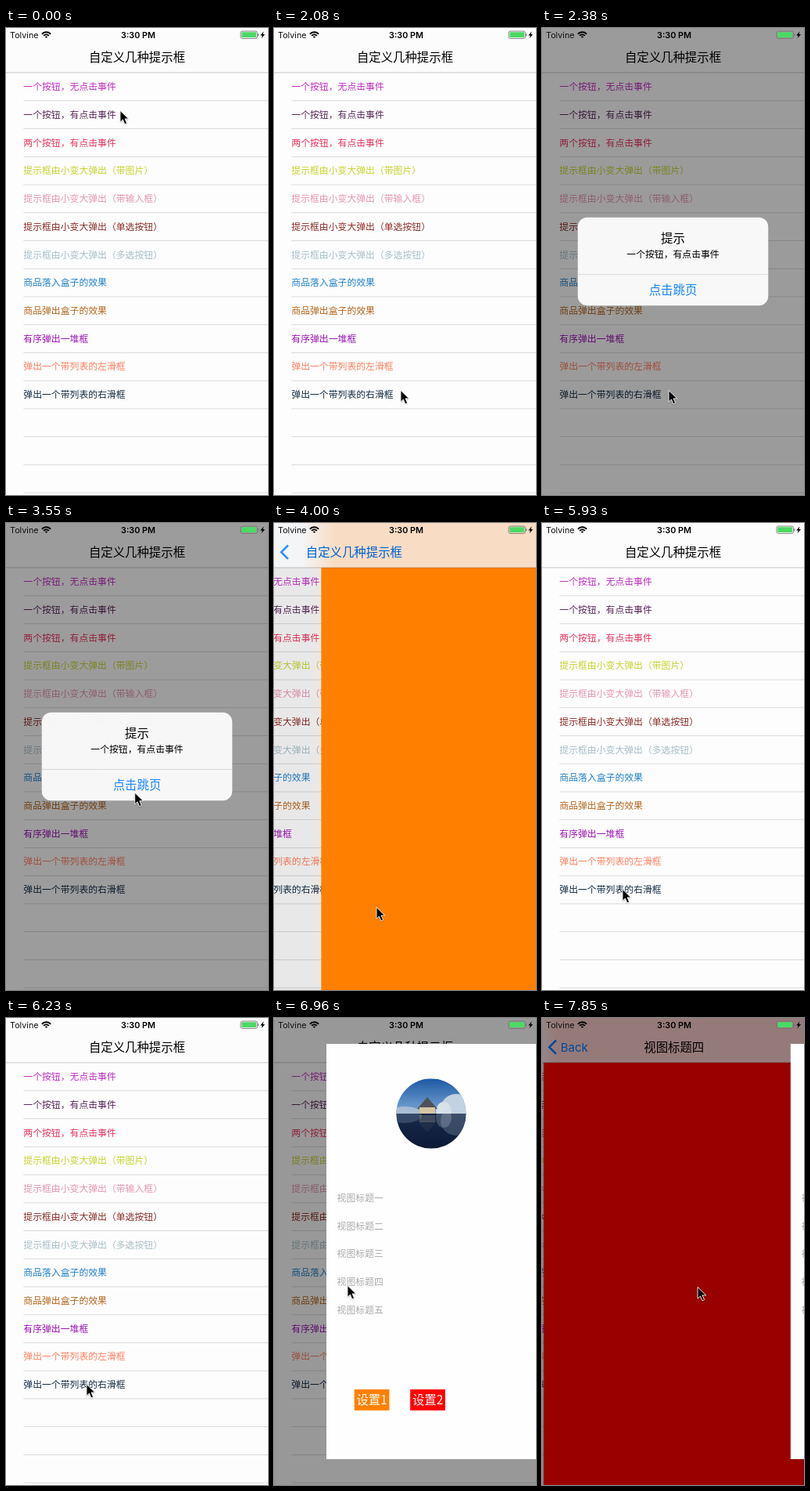
An HTML page with a canvas that plays this animation: 335 by 596 pixels, repeating every 8 s.

```html
<!DOCTYPE html>
<html lang="zh-CN">
<head>
<meta charset="utf-8">
<style>
html, body { margin: 0; width: 100%; height: 100%; overflow: hidden; background: #fdfdfd; }
canvas { display: block; width: 335px; height: 596px; }
</style>
</head>
<body>
<canvas id="stage"></canvas>
<script>
const W = 335, H = 596, LOOP = 8000, STEP = 147.8;
const PT = W / 375;                       // one point of the phone's layout
const BAR = 64 * PT, ROW = 40 * PT, INSET = 25 * PT;
const SMALL = 11.85, BIG = 15.4;
const BLUE = '#007aff';
const CJK = '"Noto Sans CJK SC", "Noto Sans CJK", sans-serif';
const LATIN = 'Inter, Roboto, sans-serif';
const TITLE = '自定义几种提示框';

const rows = [
  ['一个按钮，无点击事件', '#c031c0'],
  ['一个按钮，有点击事件', '#5a2a5a'],
  ['两个按钮，有点击事件', '#e8355f'],
  ['提示框由小变大弹出（带图片）', '#c6d32f'],
  ['提示框由小变大弹出（带输入框）', '#e596b2'],
  ['提示框由小变大弹出（单选按钮）', '#8c2e28'],
  ['提示框由小变大弹出（多选按钮）', '#a9bfc8'],
  ['商品落入盒子的效果', '#2080c8'],
  ['商品弹出盒子的效果', '#b4661c'],
  ['有序弹出一堆框', '#9a14b4'],
  ['弹出一个带列表的左滑框', '#ff8060'],
  ['弹出一个带列表的右滑框', '#142c44']
];

const orangePage = { color: '#ff8000', bar: '#f9dcc4', title: '' };
const redPage = { color: '#ff0000', bar: '#f8caca', title: '视图标题四' };

const arrow = new Path2D('M0 .4V15.2L3.4 12 5.9 17.8 8.6 16.6 6.1 10.9H10.7Z');
const bolt = new Path2D('M329.6 4.2L325.2 9.4H327.7L326.6 13.2 331 7.9H328.5Z');

const canvas = document.getElementById('stage');
const ctx = canvas.getContext('2d');
const dpr = window.devicePixelRatio || 1;
canvas.width = W * dpr;
canvas.height = H * dpr;

const clamp = v => Math.max(0, Math.min(1, v));
const ramp = (t, a, b) => clamp((t - a) / (b - a));
const mix = (a, b, p) => a + (b - a) * p;
const smooth = p => p * p * (3 - 2 * p);
const easeInOut = p => p < 0.5 ? 2 * p * p : 1 - 2 * (1 - p) ** 2;
const easeOut = p => 1 - (1 - p) ** 3;

// Critically damped settle used by navigation pushes
function settle(ms) {
  const x = Math.max(0, ms) * 0.014;
  return 1 - (1 + x) * Math.exp(-x);
}

function rect(x, y, w, h, color) {
  ctx.fillStyle = color;
  ctx.fillRect(x, y, w, h);
}

function round(x, y, w, h, r, color) {
  ctx.beginPath();
  ctx.roundRect(x, y, w, h, r);
  ctx.fillStyle = color;
  ctx.fill();
}

function oval(x, y, rx, ry, color) {
  ctx.beginPath();
  ctx.ellipse(x, y, rx, ry, 0, 0, 7);
  ctx.fillStyle = color;
  ctx.fill();
}

function fade(x0, y0, x1, y1, from, to) {
  const g = ctx.createLinearGradient(x0, y0, x1, y1);
  g.addColorStop(0, from);
  g.addColorStop(1, to);
  return g;
}

function shade(alpha) {
  if (alpha > 0) rect(0, 0, W, H, `rgba(0,0,0,${alpha})`);
}

function label(s, x, cy, size, color, { weight = 400, align = 'left', family = CJK, alpha = 1 } = {}) {
  ctx.save();
  ctx.globalAlpha *= alpha;
  ctx.font = `${weight} ${size}px ${family}`;
  ctx.textAlign = align;
  ctx.fillStyle = color;
  ctx.fillText(s, x, cy + size * 0.37);
  ctx.restore();
}

function list(dx) {
  ctx.save();
  ctx.translate(dx, 0);
  rect(0, 0, W, H, '#fdfdfd');
  for (let y = BAR + ROW; y < H; y += ROW) rect(INSET, y - 0.5, W, 0.9, '#d6d6d8');
  rows.forEach(([s, color], i) => label(s, INSET, BAR + ROW * (i + 0.5) - 0.3, SMALL, color));
  ctx.restore();
}

function navBar(x, p, page) {
  rect(0, 0, W, 57, p > 0 ? fade(x - 24, 0, x + 18, 0, '#f4f5f6', page.bar) : '#fcfcfc');
  rect(0, 56.5, W, 0.9, 'rgba(0,0,0,.24)');

  const cy = 37.2, left = mix(105.9, 26.5, p);
  const bold = { weight: 500 };
  if (p > 0) {
    ctx.save();
    ctx.globalAlpha = p;
    ctx.strokeStyle = BLUE;
    ctx.lineWidth = 2.6;
    ctx.beginPath();
    ctx.moveTo(18, cy - 8.7);
    ctx.lineTo(9.3, cy);
    ctx.lineTo(18, cy + 8.7);
    ctx.stroke();
    ctx.restore();
    if (page.title) {
      label('Back', mix(150, 23, p), cy, 15, BLUE, { family: LATIN, alpha: p });
      label(page.title, mix(W + 40, W / 2, p), cy, BIG, '#000', { ...bold, align: 'center', alpha: p });
    } else {
      label(TITLE, left, cy, BIG, BLUE);
    }
  }
  label(TITLE, left, cy, BIG, '#000', { ...(p > 0 ? {} : bold), alpha: 1 - p });
}

function statusBar() {
  label('Tolvine', 5, 9, 10.8, '#111', { family: LATIN });
  label('3:30 PM', 169, 9, 10.8, '#000', { family: LATIN, weight: 600, align: 'center' });

  ctx.strokeStyle = '#000';
  ctx.lineWidth = 1.9;
  for (let r = 1.5; r < 9; r += 3.1) {
    ctx.beginPath();
    ctx.arc(51.5, 13, r, -Math.PI * 0.76, -Math.PI * 0.24);
    ctx.stroke();
  }

  ctx.strokeStyle = '#777';
  ctx.lineWidth = 0.9;
  ctx.beginPath();
  ctx.roundRect(300, 4, 21.4, 9.4, 2.3);
  ctx.stroke();
  round(301.3, 5.3, 18.8, 6.8, 1, '#4cd964');
  rect(322.2, 7.2, 1.1, 3, '#777');
  ctx.fillStyle = '#000';
  ctx.fill(bolt);
}

function alertBox(alpha, scale) {
  if (alpha <= 0) return;
  shade(0.39 * alpha);
  ctx.save();
  ctx.globalAlpha = alpha;
  ctx.translate(W / 2, H / 2);
  ctx.scale(scale, scale);
  const w = 243.5, h = 112.3, mid = { align: 'center' };
  round(-w / 2, -h / 2, w, h, 12, '#f8f8f8');
  rect(-w / 2, 16, w, 0.8, '#d2d2d4');
  label('提示', 0, -29.3, BIG, '#000', { ...mid, weight: 500 });
  label(rows[1][0], 0, -9.7, SMALL, '#000', mid);
  label('点击跳页', 0, 36.4, BIG, '#1485ff', mid);
  ctx.restore();
}

function shore() {
  oval(-34, 0, 22, 9, '#a9bdd2');
  oval(32, -6, 20, 19, '#c3d2e0');
  oval(16, -2, 10, 13, '#d8e2ea');
  ctx.beginPath();
  ctx.moveTo(-18, -6);
  ctx.lineTo(-5, -21);
  ctx.lineTo(8, -6);
  ctx.fillStyle = '#4f5258';
  ctx.fill();
  rect(-15, -8, 20, 9, '#d6c6a2');
}

// Round lakeside picture in flat tones, mirrored in the water
function picture(cx, cy, r) {
  ctx.save();
  ctx.beginPath();
  ctx.arc(cx, cy, r, 0, 7);
  ctx.clip();
  ctx.translate(cx, cy);
  rect(-r, -r, 2 * r, r, fade(0, -r, 0, 0, '#1c59a4', '#7ba8d6'));
  shore();
  rect(-r, 0, 2 * r, r, fade(0, 0, 0, r, '#16294a', '#0c1a36'));
  ctx.globalAlpha = 0.22;
  ctx.translate(0, 3);
  ctx.scale(1, -1);
  shore();
  ctx.restore();
}

function drawer(x) {
  ctx.save();
  ctx.translate(x, 0);
  rect(0, 33, 268, 530, '#fefefe');
  picture(134, 122, 44.7);
  [...'一二三四五'].forEach((n, i) => label('视图标题' + n, 13.6, 229.6 + ROW * i, SMALL, '#aaa'));
  ['#ff8000', '#ff0000'].forEach((color, i) => {
    const bx = 35.7 + 2 * ROW * i;
    rect(bx, 474, 44.7, 26.8, color);
    label('设置' + (i + 1), bx + 22.4, 487.5, BIG, '#fff', { align: 'center' });
  });
  ctx.restore();
}

// Departure time and destination; a longer way takes longer
const DRAG = 4700, OPEN = 6240, LEAVE = 7331;
const trips = [
  [900, 162, 462], [2378, 167, 334], [3310, 131, 490], [4004, 3, 498],
  [DRAG, 130, 490], [5300, 103, 467], [6300, 94, 341], [7300, 199, 343]
];

function pointerAt(t) {
  let x = 146, y = 105;
  for (const [depart, tx, ty] of trips) {
    const time = 270 + 2.5 * Math.hypot(tx - x, ty - y);
    const p = smooth(ramp(t, depart, depart + time));
    x = mix(x, tx, p);
    y = mix(y, ty, p);
    if (p < 1) break;
  }
  return { x, y };
}

function drawPointer(t) {
  const { x, y } = pointerAt(t);
  ctx.save();
  ctx.translate(x, y);
  ctx.shadowColor = 'rgba(0,0,0,.35)';
  ctx.shadowBlur = 2 * dpr;
  ctx.shadowOffsetY = dpr;
  ctx.fillStyle = '#000';
  ctx.fill(arrow);
  ctx.shadowColor = 'transparent';
  ctx.strokeStyle = '#fff';
  ctx.stroke(arrow);
  ctx.restore();
}

// 1 when the pushed page fully covers the list
function pushed(t) {
  if (t >= LEAVE) return settle(t - LEAVE);
  if (t < DRAG) return settle(t - 3780);
  const release = DRAG + 600;
  const dragged = (pointerAt(Math.min(t, release)).x - 3) / W;
  return 1 - mix(dragged, 1, easeOut(ramp(t, release, release + 300)));
}

function draw(t) {
  ctx.setTransform(dpr, 0, 0, dpr, 0, 0);
  const p = pushed(t);
  const x = W * (1 - p);
  const page = t < LEAVE ? orangePage : redPage;

  list(-0.3 * W * p);
  if (p > 0) {
    shade(0.1 * p);
    rect(x, 0, W, H, page.color);
  }
  navBar(x, p, page);

  const shown = easeOut(ramp(t, 2130, 2370));
  alertBox(shown * (1 - smooth(ramp(t, 3390, 3760))), mix(1.2, 1, shown));

  const open = easeOut(ramp(t, OPEN, OPEN + 320)) * (1 - easeInOut(ramp(t, LEAVE, LEAVE + 628)));
  if (open > 0) {
    shade(0.4 * ramp(t, OPEN, OPEN + 200));
    drawer(mix(W, 67, open));
  }
  statusBar();
  drawPointer(t);
}

// The picture advances in even steps after a first pause
function stepTime(t) {
  return t < 900 ? 0 : 900 + Math.min(47, Math.floor((t - 892) / STEP)) * STEP;
}

const start = performance.now();
function tick() {
  draw(stepTime((performance.now() - start) % LOOP));
  requestAnimationFrame(tick);
}
tick();
</script>
</body>
</html>
```
